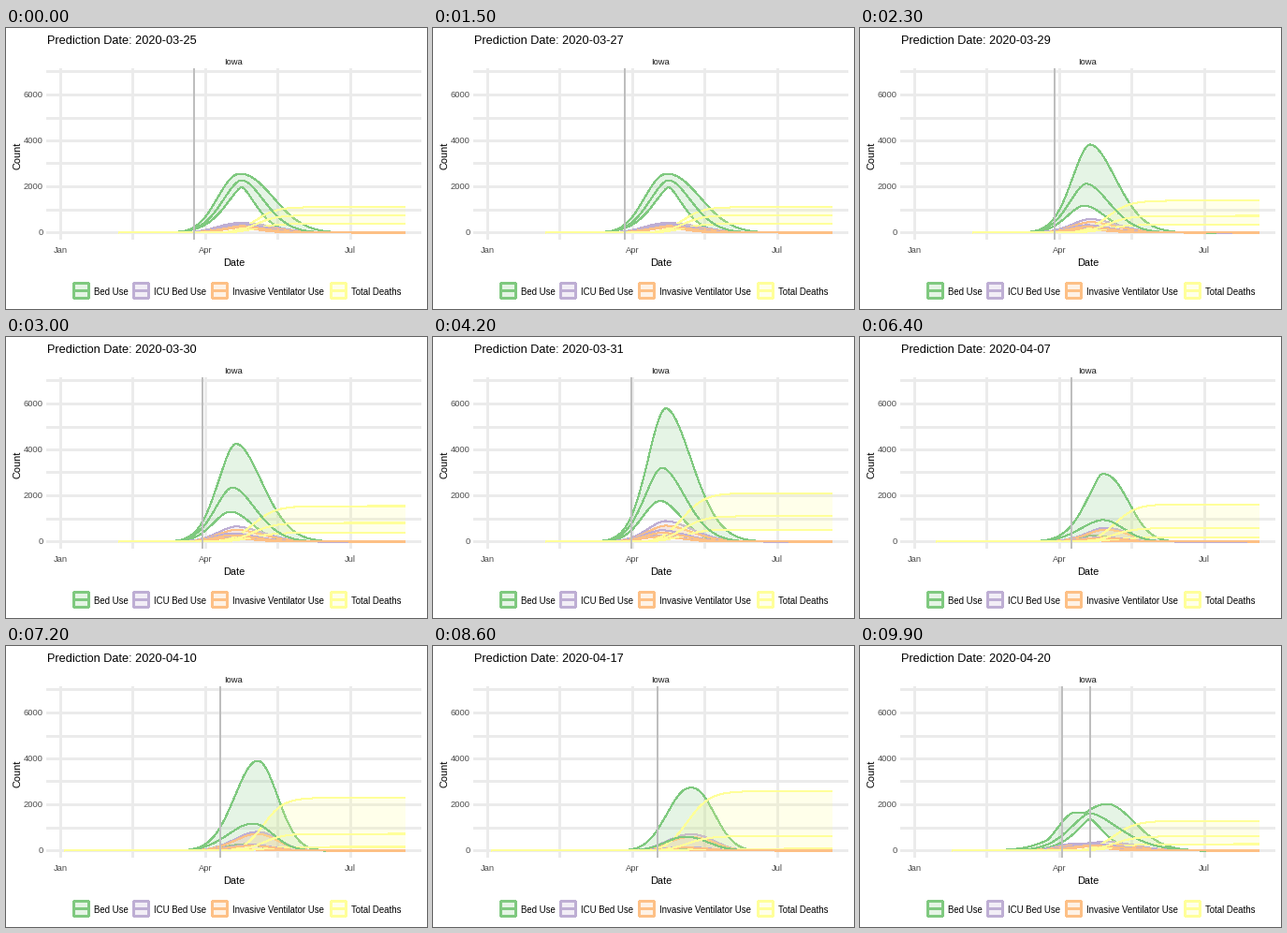
Write a matplotlib script that moves like this. It is 450 px wide and 300 px high and loops after 10 s.

```python
import numpy as np
import matplotlib.pyplot as plt
from matplotlib.animation import FuncAnimation
from matplotlib.patches import Polygon, Rectangle

W, H, DPI = 450, 300, 100
PX = 72 / DPI
BASE = 218.5                      # pixel row of zero on the count axis
LEFT, RIGHT, TOP, BOTTOM = 43, 444, 43, 226
COLORS = ["#7FC97F", "#BEAED4", "#FDC086", "#FFFF99"]
LABELS = ["Bed Use", "ICU Bed Use", "Invasive Ventilator Use", "Total Deaths"]
X = np.linspace(62, 427, 430)

plt.rcParams["font.family"] = "Liberation Sans"


def bump(center, height, left, right, power=1.9):
    """Peak in stage pixels with its own width on each side."""
    d = X - center
    return height * np.exp(-np.abs(d / np.where(d < 0, left, right)) ** power)


def forecast(start, low, mid, up, icu, vent, rise, scale, totals):
    """Start x and the low, mid and upper heights of the four series."""
    bed = np.array([low, mid, up])
    growth = 1 / (1 + np.exp((rise - X) / scale))
    growth = np.clip((growth - 0.03) / 0.97, 0, 1)
    deaths = np.outer(totals, growth)
    return start, np.array([bed, bed * icu, bed * vent, deaths])


def mix(a, b, t):
    return a[0] + (b[0] - a[0]) * t, a[1] + (b[1] - a[1]) * t


def grown(state, factor, shift=0):
    """A forecast with larger or smaller curves, moved sideways."""
    start, heights = state
    move = lambda curve: np.interp(X - shift, X, curve)
    return start, factor * np.apply_along_axis(move, 2, heights)


march25 = forecast(
    120, bump(252, 48.5, 27, 24, 1.5), bump(252, 56, 30, 35, 1.8),
    bump(250, 62.8, 32.5, 49, 2.1),
    0.165, 0.12, 267, 11, (9.5, 18.5, 27.3))
march30 = forecast(
    120, bump(240, 32, 27, 32), bump(242, 58, 27, 36, 1.8),
    bump(246, 104.5, 28, 40, 1.85),
    0.155, 0.12, 264, 12, (9.5, 20, 38))
april5 = forecast(
    120, bump(246, 7.5, 22, 22), bump(256, 18.5, 34, 22, 1.8),
    bump(257, 61, 24.5, 17.5, 1.35),
    0.19, 0.15, 260, 8, (6, 11, 18))
april10 = forecast(
    62, bump(254, 7, 28, 28), bump(264, 29, 37, 30, 2),
    bump(269, 96, 34.5, 30, 2),
    0.21, 0.185, 275, 11, (4, 18, 56.5))
april17 = forecast(
    62, bump(258, 3, 45, 40), bump(270, 15, 30, 33, 2),
    bump(276, 67.3, 34.5, 33, 2.2),
    0.26, 0.215, 272, 12, (2, 15.5, 63.5))
april20 = forecast(
    62, bump(258, 2.5, 40, 38), bump(266, 10, 26, 32),
    bump(272, 41, 27, 33, 2),
    0.24, 0.2, 273, 12, (1.5, 9.3, 40))
# Shape reached two thirds of the way back to the first forecast.
returning = forecast(
    98, bump(246, 34, 24.5, 22.7, 1.4), bump(246, 40, 32, 46, 1.65),
    np.maximum(bump(232, 41, 28, 40, 2.2), bump(264, 50, 52, 42)),
    0.19, 0.14, 271, 12, (7, 15.3, 31.8))

# Date, day of the year (1 January = 0), forecast.
STEPS = [
    ("03-25", 84, march25),
    ("03-26", 85, march25),
    ("03-27", 86, march25),
    ("03-29", 88, grown(march30, 0.9)),
    ("03-30", 89, march30),
    ("03-31", 90, grown(march30, 1.25, 2)),
    ("04-01", 91, grown(march30, 1.59, 4)),
    ("04-05", 95, april5),
    ("04-07", 97, april5),
    ("04-09", 99, grown(april10, 0.9)),
    ("04-10", 100, april10),
    ("04-13", 103, mix(april10, april17, 0.5)),
    ("04-17", 107, april17),
    ("04-20", 110, april20),
]


def day_x(day):
    return 58.1 + 1.7045 * day


def timing(k):
    """First frame and number of frames of the move away from step k."""
    if k < 2:
        return 4 + 9 * k, 3
    return (20, 4) if k == 2 else (7 + 7 * k, 3)


fig = plt.figure(figsize=(W / DPI, H / DPI), dpi=DPI, facecolor="white")
ax = fig.add_axes([0, 0, 1, 1])
ax.set_xlim(0, W)
ax.set_ylim(H, 0)
ax.axis("off")


def line(xs, ys, color, z):
    return ax.plot(xs, ys, color=color, lw=1.01 * PX, antialiased=False,
                   snap=False, zorder=z, solid_capstyle="butt",
                   solid_joinstyle="round")[0]


def label(x, y, s, size=9.4, color="black", ha="left"):
    return ax.text(x, y, s, fontsize=size * PX, color=color, ha=ha,
                   va="baseline", zorder=20)


def draw_axes():
    for n in range(8):
        y = 218 - round(24.5 * n)
        line([LEFT, RIGHT], [y + 0.5] * 2, "#EBEBEB", 1)
        if n % 2 == 0:
            label(39.7, y + 3.2, str(1000 * n), color="#4D4D4D", ha="right")
    for n in range(5):
        x = 58 + int(77.6 * n)
        line([x + 0.5] * 2, [TOP, BOTTOM], "#EBEBEB", 1)
        if n % 2 == 0:
            label(x + 0.3, 240, ("Jan", "Apr", "Jul")[n // 2],
                  color="#4D4D4D", ha="center")
    label(243.5, 39, "Iowa", color="#1A1A1A", ha="center")
    label(243.5, 254, "Date", 11, ha="center")
    ax.text(18, 136, "Count", fontsize=11 * PX, rotation=90, ha="right",
            va="center", zorder=20)


def draw_legend():
    top, side = 272.5, 16
    for x, color, s in zip((72.5, 136.5, 220.5, 347.5), COLORS, LABELS):
        ax.add_patch(Rectangle((x, top), side, side, fc=color, alpha=0.2,
                               lw=0, antialiased=False))
        right, low = x + side, top + side
        line([x, right, right, x, x], [top, top, low, low, top], color, 3)
        line([x + 1.5, right - 1.5], [top + side / 2] * 2, color, 3)
        label(x + 21.5, 285, s, 9.6)


draw_axes()
draw_legend()
title = label(43.5, 17, "", 12.8)
fills, edges, means = [], [], []
for n, c in enumerate(COLORS):
    fill = Polygon([[0, 0], [1, 0], [1, 1]], fc=c, alpha=0.2, lw=0,
                   antialiased=False, zorder=4 + n)
    fills.append(ax.add_patch(fill))
    edges.append([line([], [], c, 4.5 + n) for _ in range(2)])
    means.append(line([], [], c, 10 + n))
markers = [ax.add_patch(Rectangle((0, TOP), 2, BOTTOM - TOP, fc="#BEBEBE",
                                  lw=0, antialiased=False, zorder=15))
           for _ in range(2)]


def scene(i):
    """Date text, forecast, moving and resting marker positions at frame i."""
    k = sum(i >= sum(timing(n)) - 1 for n in range(len(STEPS) - 1))
    date, day, state = STEPS[k]
    x = day_x(day)
    leave, count = timing(k)
    t = max(0, (i - leave + 1) / count)
    _, next_day, goal = STEPS[(k + 1) % len(STEPS)]
    moving = x + (day_x(next_day) - x) * t
    if k == len(STEPS) - 1:
        return date, mix(state, returning, t * 1.5), moving, x
    return date, mix(state, goal, t), moving, moving


def update(i):
    date, (start, heights), *places = scene(i)
    title.set_text("Prediction Date: 2020-" + date)
    keep = X >= start
    x = X[keep]
    for n in range(4):
        low, mid, up = BASE - heights[n][:, keep]
        fills[n].set_xy(np.column_stack([np.r_[x, x[::-1]],
                                         np.r_[up, low[::-1]]]))
        edges[n][0].set_data(x, low)
        edges[n][1].set_data(x, up)
        means[n].set_data(x, mid)
    for marker, place in zip(markers, places):
        marker.set_x(round(place) - 1)
    return []


anim = FuncAnimation(fig, update, frames=100, interval=100, repeat=True,
                     repeat_delay=0, init_func=lambda: [], blit=False)
plt.show()
```
